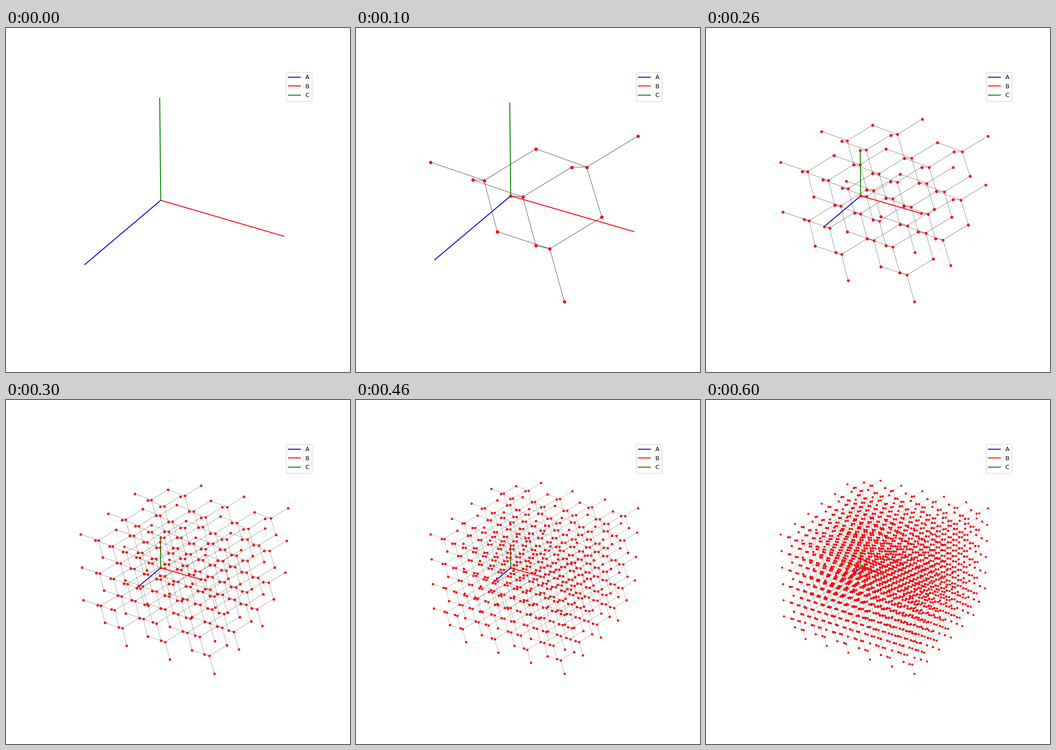
A matplotlib script that plays this animation: 748x748 px, repeating every 700 ms.

```python
import itertools

import matplotlib.pyplot as plt
import numpy as np
from matplotlib.animation import FuncAnimation
from mpl_toolkits.mplot3d.art3d import Line3DCollection

FRAMES = 7
AXES = (("A", "blue"), ("B", "red"), ("C", "green"))

# Diamond structure: centres of the four tetrahedra in a cell, and their bonds
CENTRES = np.array([(1, 1, 1), (3, 3, 1), (3, 1, 3), (1, 3, 3)]) / 4
BONDS = np.array([(-1, -1, -1), (1, 1, -1), (1, -1, 1), (-1, 1, 1)]) / 4

fig = plt.figure(figsize=(8, 8), dpi=93.5)
ax = fig.add_subplot(projection="3d", computed_zorder=False)


def lattice(n):
    """Tetrahedron centres and their four corners for n x n x n cells."""
    cells = np.array(list(itertools.product(range(n), repeat=3)))
    centres = (cells[:, None] + CENTRES).reshape(-1, 3)
    return centres, centres[:, None] + BONDS


def draw_crystal(n):
    centres, corners = lattice(n)
    starts = np.broadcast_to(centres[:, None], corners.shape)
    bonds = np.stack([starts, corners], axis=2).reshape(-1, 2, 3)
    ax.add_collection3d(
        Line3DCollection(bonds, colors="black", linewidths=1 / (n + 1), zorder=1))
    atoms = np.vstack([centres, corners.reshape(-1, 3)])
    ax.scatter(*atoms.T, s=40 / (n + 1), color="red", depthshade=False, zorder=3)


def update(n):
    ax.clear()
    ax.set_axis_off()
    ax.view_init(elev=30, azim=30)
    for (name, color), tip in zip(AXES, np.eye(3)):
        ax.plot(*np.stack([np.zeros(3), tip], axis=1), color=color, label=name, zorder=2)
    if n:
        draw_crystal(n)
    ax.legend(loc="upper right")
    return []


anim = FuncAnimation(fig, update, frames=FRAMES, interval=100, repeat=True,
                     repeat_delay=0, init_func=lambda: [], blit=False)
plt.show()
```
